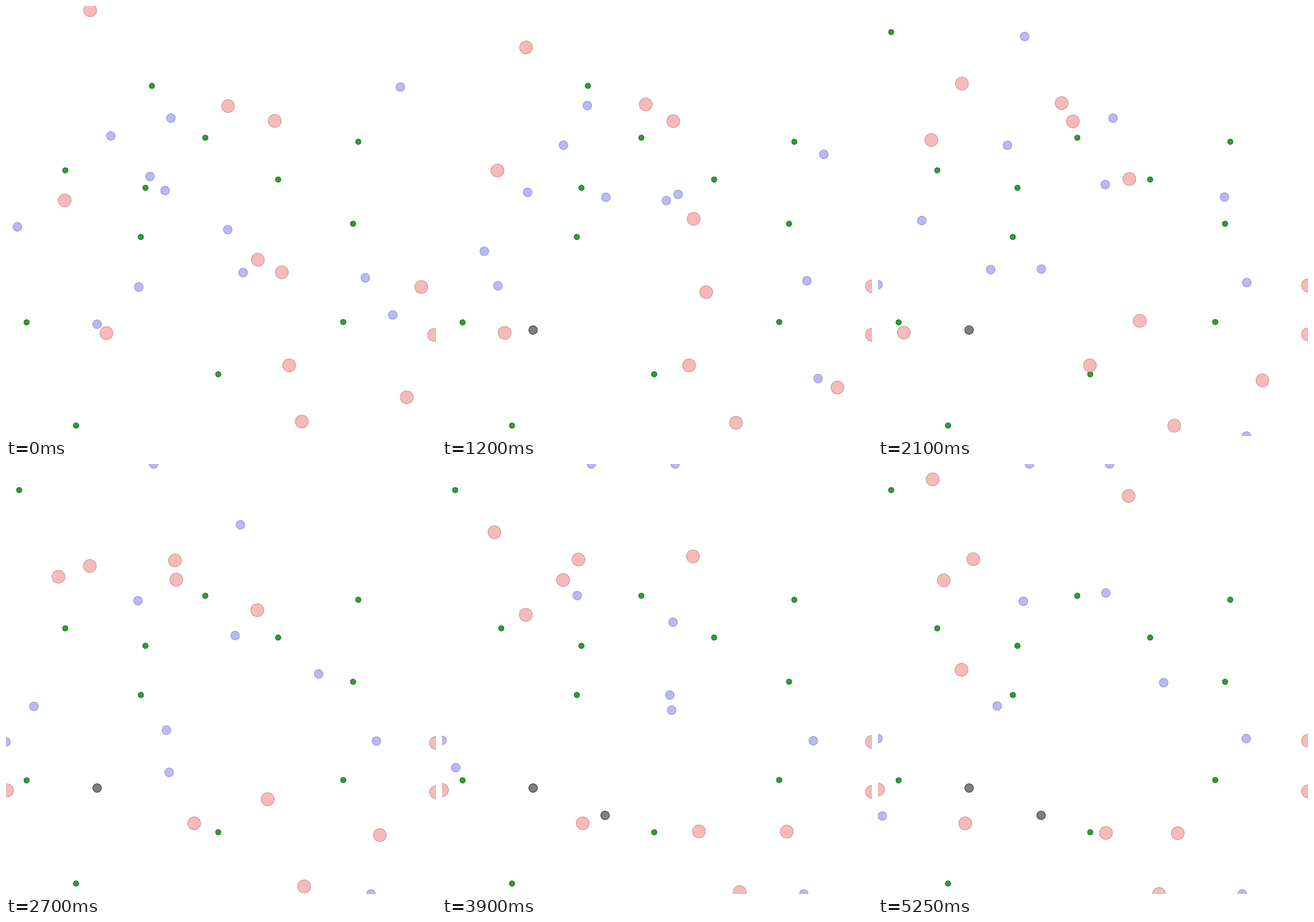
A matplotlib script that plays this animation: 700x700 px, repeating every 5400 ms.

```python
import numpy as np
import matplotlib.pyplot as plt
from matplotlib.animation import FuncAnimation
from matplotlib.patches import Circle

SIZE, DPI = 700, 100
FRAMES, INTERVAL = 36, 150
LAST = FRAMES - 1
EATEN = 10  # step at which one plant is eaten and regrows elsewhere
OLD_SPOT, NEW_SPOT = (237.5, 130), (21.5, 42.5)

# radius, fill, edge, layer
HUNTER = 10.5, "#f8b9b9", "#c49494", 2
PREY = 7, "#b9b9f8", "#9090cc", 3
PLANT = 4.3, "#28a428", "#146414", 1
DEAD_FILL, DEAD_EDGE = (0, 0, 0, 0.5), (0, 0, 0, 0.65)

fig = plt.figure(figsize=(SIZE / DPI, SIZE / DPI), dpi=DPI, facecolor="white")
ax = fig.add_axes([0, 0, 1, 1])
ax.set(xlim=(0, SIZE), ylim=(SIZE, 0))
ax.axis("off")


def travel(t):
    """Distance in cruise steps: slow start, then constant speed."""
    return t - 2 * (1 - np.exp(-t / 2.5))


def curve(keys):
    """Smooth curve through (step, x, y) keys, stopped by the walls."""
    t, x, y = np.array(keys, float).T
    scale = travel(LAST)
    u = travel(np.arange(FRAMES)) / scale
    return [np.clip(np.polyval(np.polyfit(travel(t) / scale, v, len(t) - 1), u),
                    0, SIZE) for v in (x, y)]


def dot(kind, x, y):
    r, fill, edge, layer = kind
    return ax.add_patch(Circle((x, y), r, fc=fill, ec=edge,
                               lw=72 / DPI, zorder=layer))


class Mover:
    def __init__(self, kind, *keys, death=FRAMES):
        self.x, self.y = curve(keys)
        self.kind, self.death = kind, death
        self.patch = dot(kind, self.x[0], self.y[0])

    def show(self, i):
        k = min(i, self.death)
        dead = i >= self.death
        self.patch.center = self.x[k], self.y[k]
        self.patch.set_facecolor(DEAD_FILL if dead else self.kind[1])
        self.patch.set_edgecolor(DEAD_EDGE if dead else self.kind[2])
        return self.patch


def straight(kind, x0, y0, x1, y1):
    return Mover(kind, (0, x0, y0), (LAST, x1, y1))


movers = [
    # Straight runs; ends outside the stage press the dot against a wall.
    straight(HUNTER, 137, 7, 136, 335),
    straight(HUNTER, 437.5, 187, 107, 189.5),
    straight(HUNTER, 410, 413, 408, 52),
    straight(HUNTER, 461, 585, 142, 585),
    straight(HUNTER, 676, 457.5, 960, 450.5),
    straight(HUNTER, 697, 535.5, 1030, 533),
    straight(HUNTER, 163.5, 532.5, -170, 530),
    straight(PREY, 234.5, 277.5, 246.5, -349),
    straight(PREY, 386, 434, 377, -257),
    straight(PREY, 216, 457.5, -462, 447),

    # Bending paths
    Mover(HUNTER, (0, 361.5, 163), (18, 275, 157), (LAST, 155, 155)),
    Mover(HUNTER, (0, 95.5, 316.5), (18, 85.5, 183.5), (LAST, 89, 25)),
    Mover(HUNTER, (0, 652.5, 637), (18, 608.5, 604), (LAST, 488, 601)),
    Mover(HUNTER, (0, 449, 433.5), (11, 427, 488), (23, 423.5, 582),
          (LAST, 371, 600.5)),
    Mover(HUNTER, (0, 481.5, 676.5), (11, 480, 680.5), (23, 486.5, 693.5),
          (LAST, 457.5, 705)),
    Mover(PREY, (0, 629.5, 503), (11, 605.5, 658.5), (LAST, 593, 1130)),
    Mover(PREY, (0, 642, 132), (11, 597, 280), (23, 426, 366.5),
          (LAST, 194, 394)),
    Mover(PREY, (0, 259, 300.5), (11, 100.5, 322), (23, 28, 457.5),
          (LAST, 7, 573)),
    Mover(PREY, (0, 18.5, 359.5), (11, 123, 417), (23, 339, 418),
          (30, 411.5, 375), (LAST, 465, 356)),

    # Dawdlers
    Mover(PREY, (0, 170.5, 211.5), (11, 205.5, 228), (23, 218, 216.5),
          (LAST, 236.5, 223.5)),
    Mover(PREY, (0, 361, 364), (11, 367.5, 302), (23, 375.5, 266.5),
          (LAST, 371, 210)),
    Mover(PREY, (0, 585, 442.5), (11, 597.5, 449), (23, 604.5, 451),
          (LAST, 599.5, 447)),

    # Caught prey
    Mover(PREY, (0, 268.5, 182.5), (18, 265.5, 502), (22, 265.5, 572), death=22),
    Mover(PREY, (0, 148.3, 518), (1, 148.3, 527.5), death=1),
]

for spot in [(324.5, 214.5), (573.5, 221), (96.5, 267.5), (443, 282.5),
             (227, 296), (219.5, 376), (565, 354.5), (33.5, 515),
             (549, 514.5), (345.5, 599.5), (114, 683)]:
    dot(PLANT, *spot)
plant = dot(PLANT, *OLD_SPOT)


def draw(i):
    plant.center = OLD_SPOT if i < EATEN else NEW_SPOT
    return [plant] + [m.show(i) for m in movers]


anim = FuncAnimation(fig, draw, frames=FRAMES, interval=INTERVAL,
                     repeat=True, repeat_delay=0)
plt.show()
```
